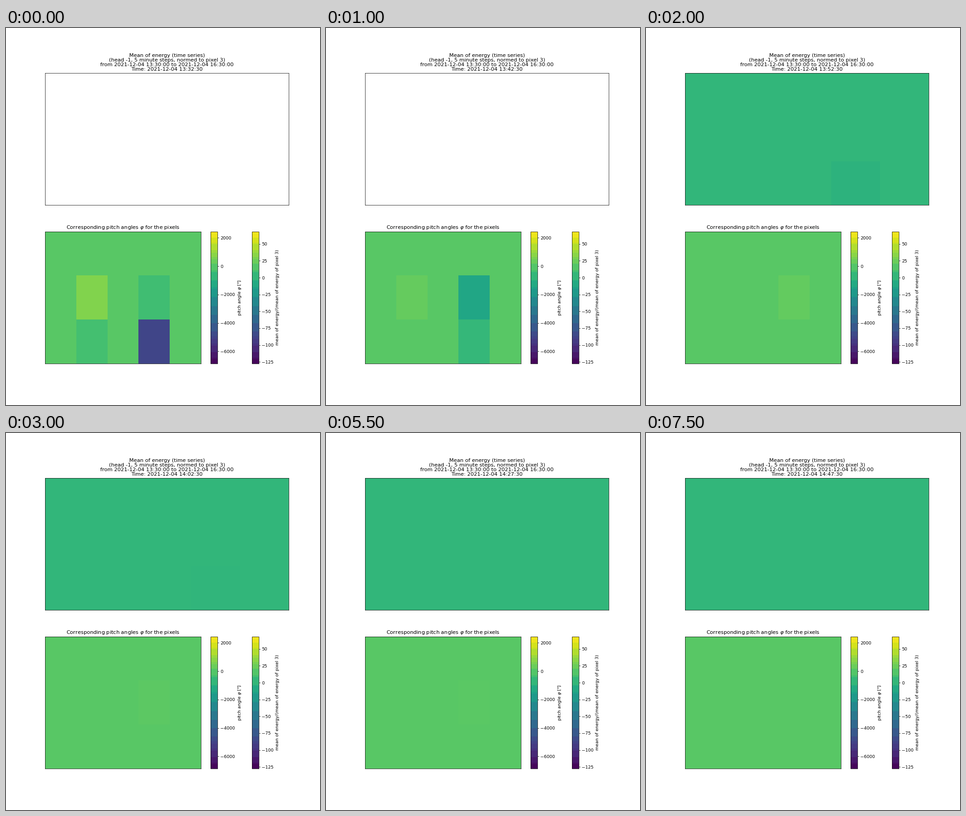
A matplotlib script for the animation above (8 s loop, 683 by 820 pixels).

```python
import matplotlib.pyplot as plt
import numpy as np
from matplotlib.animation import FuncAnimation
from matplotlib.cm import ScalarMappable
from matplotlib.colors import ListedColormap, Normalize

WIDTH, HEIGHT, DPI = 683, 820, 68
FRAMES, INTERVAL = 16, 500
ROWS, COLS = 3, 5

PITCH_NORM = Normalize(-6858, 2437)
ENERGY_NORM = Normalize(-127.4, 68.4)
PITCH_BASE, ENERGY_BASE = 40, 1.2
ENERGY_START = 3  # step at which the energy series has data

# (row, column): (first offset from the base, factor per step)
EARLY_PITCH = {(1, 1): (620, 0.55), (1, 3): (-460, 1.75),
               (2, 1): (-380, 0), (2, 3): (-4990, 0.38)}
LATE_PITCH = {(1, 3): (280, 0.6)}
LATE_ENERGY = {(1, 3): (10.2, 0), (2, 3): (-9.5, 0.3)}

TITLE = ("Mean of energy (time series)\n"
         "(head -1, 5 minute steps, normed to pixel 3)\n"
         "from 2021-12-04 13:30:00 to 2021-12-04 16:30:00\n"
         "Time: 2021-12-04 {}")


def stepped_viridis():
    """Viridis merged into flat bands of similar colour."""
    rgb = plt.get_cmap("viridis")(np.arange(256))[:, :3]
    keys = np.floor(rgb * 255 / (32, 16, 32))
    band = np.cumsum(np.r_[0, np.any(np.diff(keys, axis=0), axis=1)])
    means = np.array([rgb[band == b].mean(axis=0) for b in range(band[-1] + 1)])
    return ListedColormap(means[band])


def clock(step):
    seconds = (13 * 60 + 32) * 60 + 30 + step * 300
    return f"{seconds // 3600:02d}:{seconds // 60 % 60:02d}:{seconds % 60:02d}"


def grid(base, pulses, age):
    values = np.full((ROWS, COLS), float(base))
    for cell, (offset, factor) in pulses.items():
        values[cell] += offset * factor ** age
    return values


def pixel_map(ax, norm):
    mesh = ax.pcolormesh(np.zeros((ROWS, COLS)), norm=norm, cmap="viridis")
    ax.invert_yaxis()
    ax.set(xticks=[], yticks=[])
    return mesh


plt.rcParams["font.size"] = 10.05
fig, (top, bottom) = plt.subplots(
    2, 1, figsize=(WIDTH / DPI, HEIGHT / DPI), dpi=DPI,
    gridspec_kw={"left": 84.9 / WIDTH, "right": 615 / WIDTH})
energy_mesh = pixel_map(top, ENERGY_NORM)
pitch_mesh = pixel_map(bottom, PITCH_NORM)
title = top.set_title(TITLE.format(clock(0)), linespacing=1)
bottom.set_title(r"Corresponding pitch angles $\varphi$ for the pixels")

bands = stepped_viridis()
for norm, label in [
    (ENERGY_NORM, "mean of energy/(mean of energy of pixel 3)"),
    (PITCH_NORM, r"pitch angle $\varphi$ [°]"),
]:
    fig.colorbar(ScalarMappable(norm, bands), ax=bottom, label=label)


def update(step):
    late = step >= ENERGY_START
    age = step - ENERGY_START if late else step
    title.set_text(TITLE.format(clock(step)))
    pitch_mesh.set_array(grid(PITCH_BASE, LATE_PITCH if late else EARLY_PITCH, age))
    energy_mesh.set_array(grid(ENERGY_BASE, LATE_ENERGY, age))
    energy_mesh.set_visible(late)
    return title, pitch_mesh, energy_mesh


anim = FuncAnimation(fig, update, frames=FRAMES, interval=INTERVAL,
                     repeat=True, repeat_delay=0, blit=False)
plt.show()
```
